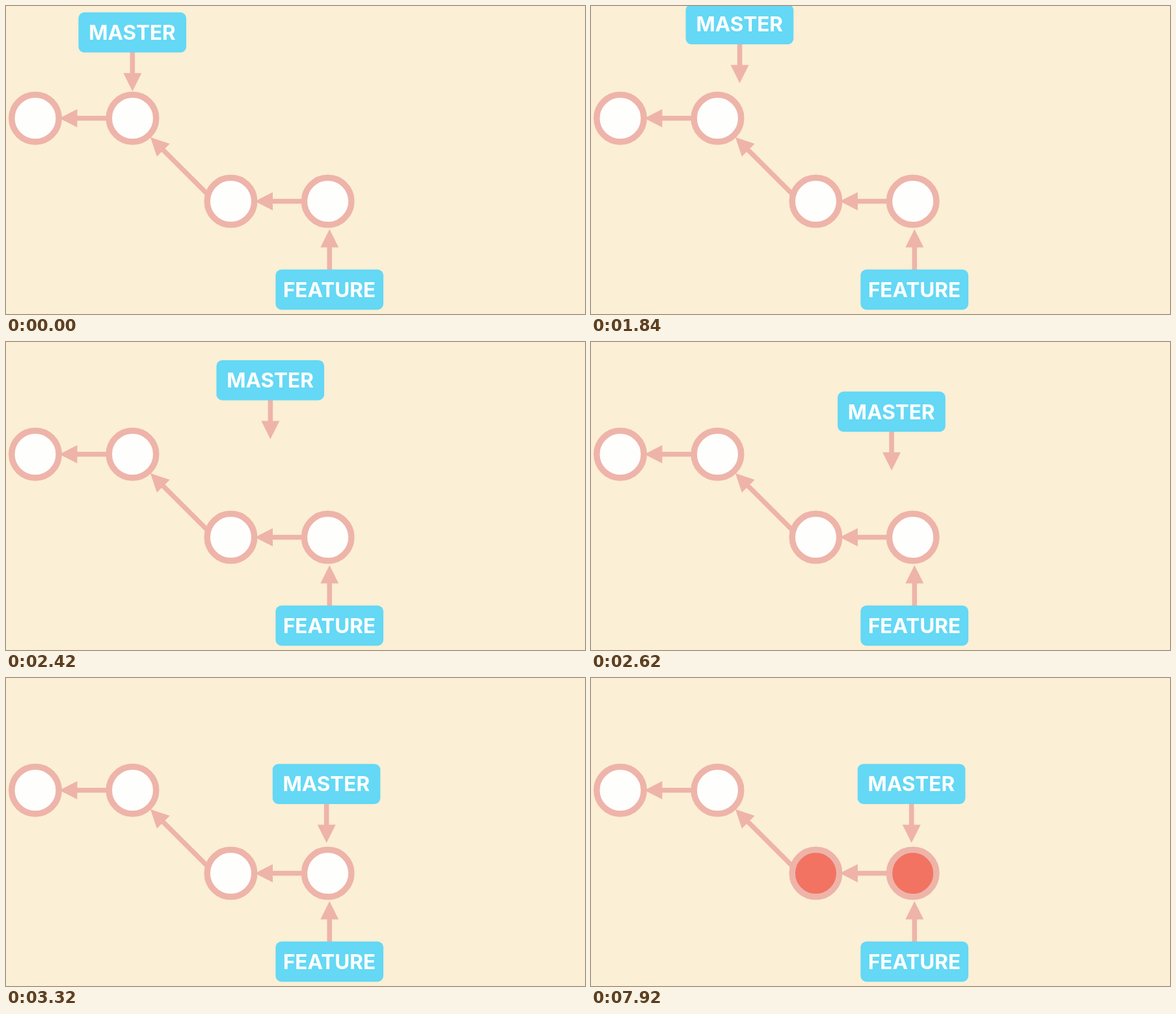
Recreate the animation shown at these times as an HTML page. Size 890 by 474 pixels, loop 7.96 s.

```html
<!DOCTYPE html>
<html lang="en">
<head>
<meta charset="utf-8">
<title>Moving a branch label</title>
<style>
  html, body { margin: 0; width: 100%; height: 100%; overflow: hidden; background: #fbefd5; }
  svg { display: block; width: 890px; height: 474px; }

  .arrow { fill: #eeb4a9; stroke: none; }
  .commit { fill: #fefefd; stroke: #eeb4a9; stroke-width: 9.5; }
  .label rect { fill: #64d8f5; }
  .label text {
    fill: #fff;
    font: 700 31.5px Inter, "Open Sans", sans-serif;
    text-anchor: middle;
  }

  .slide { animation: slide 7960ms infinite; }
  .arc { animation: arc 7960ms infinite; }
  .merged { animation: fill 7960ms linear infinite; }

  /* label path: 1520 to 3320 ms, x and y eased separately */
  @keyframes slide {
    0% { transform: translateX(0); }
    19.0955% { transform: translateX(0); animation-timing-function: cubic-bezier(.333, 0, .667, .341); }
    23.1156% { transform: translateX(34px); animation-timing-function: cubic-bezier(.333, .246, .667, .591); }
    28.1407% { transform: translateX(148px); animation-timing-function: cubic-bezier(.333, .333, .667, .662); }
    28.8945% { transform: translateX(169px); animation-timing-function: cubic-bezier(.333, .382, .667, .806); }
    32.9146% { transform: translateX(267.5px); animation-timing-function: cubic-bezier(.333, 1.011, .667, .899); }
    38.9447% { transform: translateX(296.3px); animation-timing-function: cubic-bezier(.333, .66, .667, 1); }
    41.7085%, 100% { transform: translateX(298.3px); }
  }
  @keyframes arc {
    0% { transform: translateY(0); }
    19.0955% { transform: translateY(0); animation-timing-function: cubic-bezier(.333, 0, .667, .573); }
    23.1156% { transform: translateY(-12.5px); animation-timing-function: cubic-bezier(.333, -3.03, .667, -4.15); }
    28.1407% { transform: translateY(-10.3px); animation-timing-function: cubic-bezier(.333, .27, .667, .587); }
    28.8945% { transform: translateY(-4px); animation-timing-function: cubic-bezier(.333, .197, .667, .651); }
    32.9146% { transform: translateY(66.3px); animation-timing-function: cubic-bezier(.333, .719, .667, .875); }
    38.9447% { transform: translateY(117.5px); animation-timing-function: cubic-bezier(.333, .587, .667, 1); }
    41.7085%, 100% { transform: translateY(122.4px); }
  }
  @keyframes fill {
    0%, 78.643% { fill: #fefefd; }
    78.6432%, 79.39% { fill: #fdf7f5; }
    87.1859%, 100% { fill: #f27362; }
  }
</style>
</head>
<body>
<svg viewBox="0 0 890 474">
  <defs>
    <path id="short" d="M0 0L27.5-14V-3.75H75V3.75H27.5V14Z"/>
    <path id="long" d="M0 0L28-14V-3.75H124V3.75H28V14Z"/>
    <path id="stub" d="M0 0L28-14V-3.75H64V3.75H28V14Z"/>
    <rect id="box" width="165.7" height="61.8" rx="9"/>
  </defs>

  <g class="arrow">
    <use href="#short" x="82" y="172.7"/>
    <use href="#short" x="382.5" y="300.5"/>
    <use href="#long" transform="translate(222 202) rotate(45)"/>
    <use href="#stub" transform="translate(497.3 343.5) rotate(90)"/>
  </g>

  <g class="commit">
    <circle cx="45" cy="172.7" r="36.25"/>
    <circle cx="194.5" cy="172.7" r="36.25"/>
    <circle class="merged" cx="345.5" cy="300.5" r="36.25"/>
    <circle class="merged" cx="494.7" cy="300.5" r="36.25"/>
  </g>

  <g class="label">
    <use href="#box" x="414.4" y="405.6" fill="#64d8f5"/>
    <text x="497" y="447.5">FEATURE</text>
  </g>

  <g class="slide"><g class="arc">
    <use class="arrow" href="#stub" transform="translate(194.4 131.3) rotate(-90)"/>
    <g class="label">
      <use href="#box" x="111.4" y="9.8" fill="#64d8f5"/>
      <text x="194" y="52">MASTER</text>
    </g>
  </g></g>
</svg>
</body>
</html>
```
